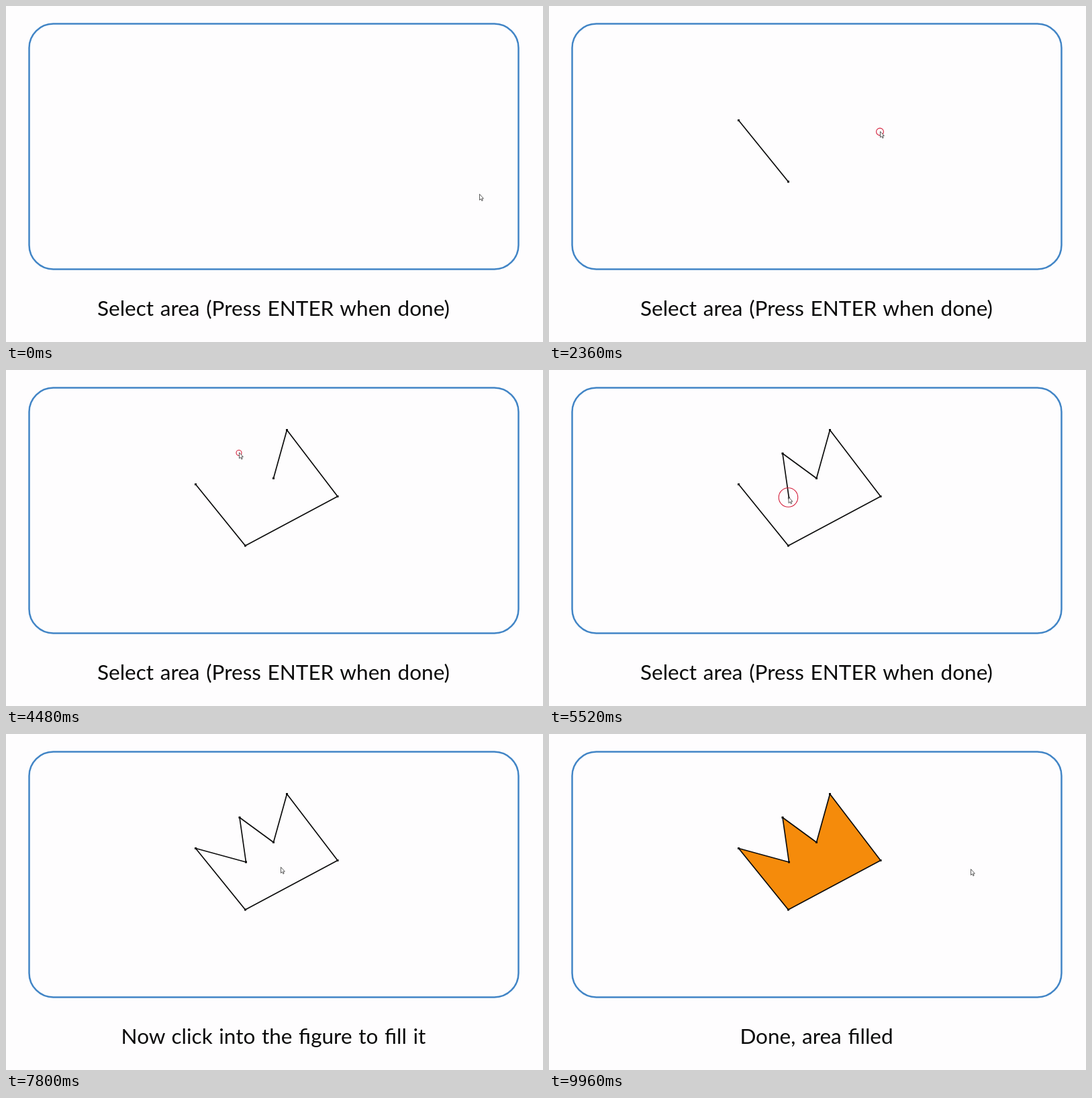
These frames come from a looping animation (800x501 px, 10000 ms). An HTML page:

```html
<!DOCTYPE html>
<html lang="en">
<head>
<meta charset="utf-8">
<title>Select and fill</title>
<style>
  html, body { margin: 0; width: 100%; height: 100%; overflow: hidden; background: #fefdfe; }
  svg { display: block; width: 100%; height: 100%; }
  text { font: 31.5px Carlito, Lato, sans-serif; word-spacing: 1.6px; fill: #0a0a0a; text-anchor: middle; }
</style>
</head>
<body>
<svg viewBox="0 0 800 501">
  <rect width="800" height="501" fill="#fefdfe"/>
  <rect x="34.5" y="26.5" width="729" height="366" rx="36" fill="none" stroke="#4285c6" stroke-width="2.5"/>
  <path id="area" fill="none" stroke="#0c0c0c" stroke-width="1.7" stroke-linejoin="round"/>
  <path id="dots" stroke="#0a0a0a" stroke-width="3" stroke-linecap="square"/>
  <text id="caption" x="398.5" y="462"></text>
  <circle id="ring" fill="none" stroke="#d41f3c" stroke-width="1.1"/>
  <path id="cursor" d="M0.5 0.5V9.4L2.5 7.6L3.9 10.6L5.2 10L3.9 7.1H6.4Z" fill="#fff" stroke="#4a4a4a" stroke-width="0.9" stroke-linejoin="round"/>
</svg>
<script>
const LOOP = 10000, STEP = 40;
const FIRST = 750, PERIOD = 721;              // steady clicking rhythm
const REST = 450, RING_MS = 530, RING_MAX = 17, MARK_DELAY = 340;
const CLOSE = 6200, FILL_CLICK = 7850, FILL = FILL_CLICK + MARK_DELAY;

const corners = [
  { x: 282.5, y: 170.5 }, { x: 356.5, y: 262 }, { x: 494, y: 188.5 }, { x: 418.5, y: 89.5 },
  { x: 398.5, y: 161.5 }, { x: 348, y: 124.5 }, { x: 357.5, y: 191 }
];

// The pointer rests at each stop from its time until it has stayed long enough
const stop = (t, x, y, stay = 0) => ({ t, x, y, end: t + stay });
const stops = [
  stop(0, 705, 280, 160),
  ...corners.map((c, i) => stop(FIRST + i * PERIOD, c.x - 1, c.y - 2, REST)),
  stop(7800, 409, 198, 1100),
  stop(9400, 388, 114),
  stop(9900, 628, 201, 100)
];
stops.splice(2, 0, stop(1400, 335, 285));
const clicks = [...corners.map((c, i) => FIRST + i * PERIOD), FILL_CLICK];

const [area, dots, caption, ring, cursor] =
  ["area", "dots", "caption", "ring", "cursor"].map(id => document.getElementById(id));

const ease = u => u * u * (3 - 2 * u);

function pointer(t) {
  const i = stops.findLastIndex(s => t >= s.t);
  const a = stops[i], b = stops[i + 1];
  if (!b || t <= a.end) return a;
  const k = ease((t - a.end) / (b.t - a.end));
  return { x: a.x + (b.x - a.x) * k, y: a.y + (b.y - a.y) * k };
}

function draw(t) {
  const p = pointer(t);
  cursor.setAttribute("transform", `translate(${p.x} ${p.y})`);

  const shown = corners.filter((c, i) => t >= clicks[i] + MARK_DELAY);
  const line = shown.map(c => `${c.x} ${c.y}`).join("L");
  area.setAttribute("d", line ? "M" + line + (t >= CLOSE ? "Z" : "") : "");
  area.setAttribute("fill", t >= FILL ? "#f58b0b" : "none");
  dots.setAttribute("d", shown.map(c => `M${c.x} ${c.y}h0`).join(""));

  const start = clicks.find(c => t >= c && t < c + RING_MS);
  const active = start !== undefined;
  const spot = active ? pointer(start) : p;
  ring.setAttribute("cx", spot.x);
  ring.setAttribute("cy", spot.y + 1);
  ring.setAttribute("r", active ? (t - start) / RING_MS * RING_MAX : 0);

  const words = t >= FILL ? "Done, area filled"
    : t >= CLOSE ? "Now click into the figure to fill it"
    : "Select area (Press ENTER when done)";
  if (caption.textContent !== words) caption.textContent = words;
}

const begin = performance.now();
function tick() {
  const t = Math.max(0, performance.now() - begin) % LOOP;
  draw(Math.floor(t / STEP) * STEP);
  requestAnimationFrame(tick);
}
draw(0);
requestAnimationFrame(tick);
</script>
</body>
</html>
```
